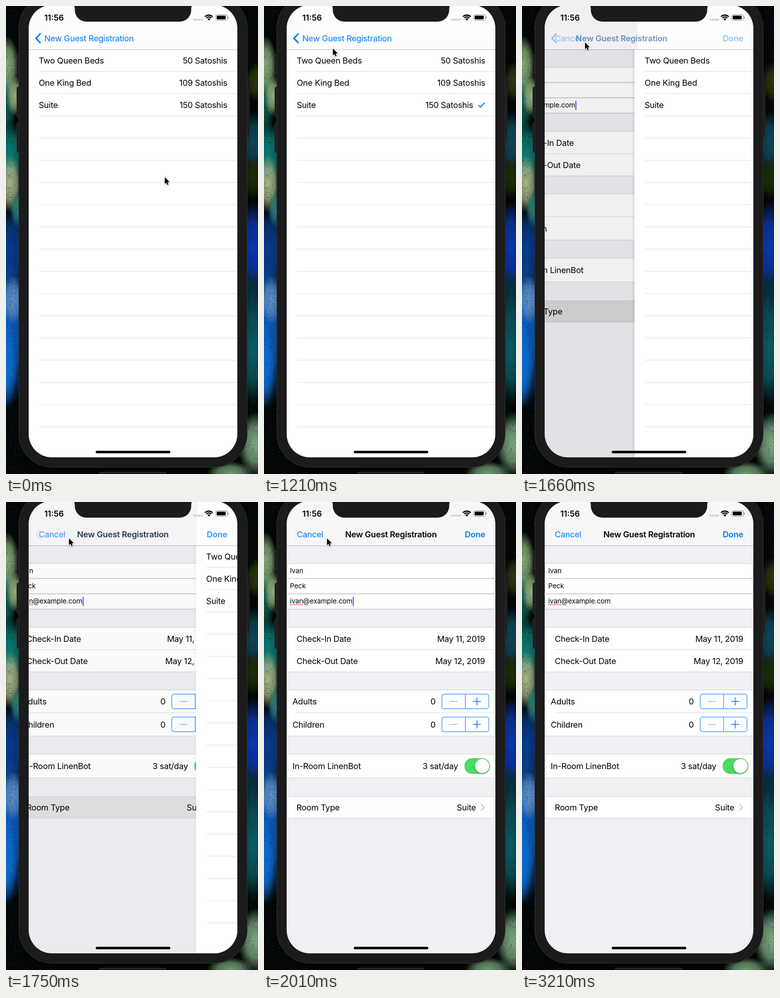
An HTML page with a canvas that plays this animation: 500 px wide and 927 px high, repeating every 3310 ms.

```html
<!DOCTYPE html>
<html lang="en">
<head>
<meta charset="utf-8">
<title>Guest registration</title>
<style>
  html, body { margin: 0; width: 100%; height: 100%; overflow: hidden; background: #000; }
  canvas { display: block; }
</style>
</head>
<body>
<canvas id="stage" width="500" height="927"></canvas>
<script>
const LOOP = 3310, BLUE = '#007aff', LEFT = 45, WIDTH = 414;
const stage = document.getElementById('stage');
let c = stage.getContext('2d');

// ---------- helpers ----------
function rect(x, y, w, h, fill) {
  c.fillStyle = fill;
  c.fillRect(x, y, w, h);
}

function box(x, y, w, h, r, fill, stroke) {
  c.beginPath();
  c.roundRect(x, y, w, h, r);
  if (fill) { c.fillStyle = fill; c.fill(); }
  if (stroke) { c.strokeStyle = stroke; c.lineWidth = 1; c.stroke(); }
}

function line(points, color, width) {
  c.beginPath();
  points.forEach(([x, y]) => c.lineTo(x, y));
  c.strokeStyle = color;
  c.lineWidth = width;
  c.stroke();
}

function text(s, x, y, { color = '#000', align = 'left', weight = 400, size = 16.5 } = {}) {
  c.font = `${weight} ${size}px Inter, "Open Sans", sans-serif`;
  c.letterSpacing = size < 15 ? '-0.1px' : size < 16.5 ? '0px' : '-0.25px';
  c.textAlign = align;
  c.fillStyle = color;
  c.fillText(s, x, y);
}

function faded(alpha, draw) {
  c.save();
  c.globalAlpha *= Math.max(0, Math.min(1, alpha));
  draw();
  c.restore();
}

const right = { align: 'right' };

// ---------- desktop and phone body, drawn once ----------
function blob(x, y, rx, ry, color) {
  const g = c.createRadialGradient(0, 0, 0, 0, 0, 1);
  g.addColorStop(0, color);
  g.addColorStop(0.55, color + 'c0');
  g.addColorStop(1, color + '00');
  c.save();
  c.translate(x, y);
  c.scale(rx, ry);
  rect(-1, -1, 2, 2, g);
  c.restore();
}

function drawDesktop() {
  rect(0, 0, 500, 927, '#030606');
  [
    [0, 190, 22, 70, '#0d5a4c'], [2, 118, 24, 60, '#86a877'], [18, 178, 18, 40, '#93aa7a'],
    [8, 290, 32, 60, '#0a7a74'], [8, 352, 24, 58, '#a3b588'], [22, 405, 14, 38, '#2a8274'],
    [8, 485, 36, 85, '#083c92'], [4, 650, 40, 150, '#0a60c6'], [14, 582, 24, 48, '#5d8bc4'],
    [0, 715, 22, 80, '#0b6cd0'], [498, 150, 24, 40, '#2a360c'], [492, 270, 26, 62, '#0f465c'],
    [490, 340, 22, 42, '#1b2e05'], [490, 480, 32, 95, '#0a38b0'], [490, 580, 26, 60, '#06323e'],
    [490, 680, 30, 110, '#0b5c64'], [496, 868, 36, 64, '#7aa880'], [445, 926, 46, 24, '#6b966c']
  ].forEach(b => blob(...b));

  let seed = 7;
  const rnd = () => (seed = seed * 16807 % 2147483647) / 2147483647;
  const specks = ['#000', '#031416', '#0b4a4c', '#2c4a1c'];
  for (let i = 0; i < 1500; i++) {
    const x = rnd() < 0.5 ? rnd() * 34 : 500 - rnd() * 34;
    rect(x | 0, rnd() * 927 | 0, 1, 1, specks[rnd() * 4 | 0]);
  }

  box(184.5, 923.5, 134, 12, 4, '#1c1c1c', '#3a3a3a');
  [[21.5, 97.5, 34], [21.5, 160.5, 60], [21.5, 230.5, 60], [475.5, 161.5, 99]]
    .forEach(([x, y, h]) => box(x, y, 7, h, 2, '#191919', '#303030'));
  box(25.5, -22, 453, 935.5, 66, '#1b1b1b', '#343434');
}

// ---------- room list ----------
function drawList(checked) {
  rect(LEFT, 86, WIDTH, 810, '#fff');
  for (let y = 129; y < 840; y += 44) rect(65, y, 394, 1, '#e1e1e3');
  [['Two Queen Beds', 50], ['One King Bed', 109], ['Suite', 150]].forEach(([name, price], i) => {
    const y = 114 + i * 44, on = checked && i === 2;
    text(name, 65, y);
    text(price + ' Satoshis', on ? 415 : 439, y, right);
    if (on) line([[425.5, 196.5], [429.5, 200.5], [437.5, 191.5]], BLUE, 2);
  });
}

// ---------- registration form ----------
function group(top, bottom, fill = '#fff') {
  rect(LEFT, top, WIDTH, bottom - top, fill);
  rect(LEFT, top, WIDTH, 1, '#d6d6d9');
  rect(LEFT, bottom - 1, WIDTH, 1, '#d6d6d9');
}

function stepper(label, y) {
  text(label, 57, y + 6);
  text('0', 341, y + 6, right);
  box(353.5, y - 14.5, 93, 29, 4, null, BLUE);
  line([[400, y - 14.5], [400, y + 14.5]], BLUE, 1);
  line([[369, y], [384.5, y]], '#80bcff', 1.4);
  line([[415, y], [431, y]], BLUE, 1.5);
  line([[423, y - 8], [423, y + 8]], BLUE, 1.5);
}

function drawForm(selected, caret) {
  rect(LEFT, 86, WIDTH + 130, 810, '#efeff4');

  group(121, 213);
  ['Ivan', 'Peck', 'ivan@example.com'].forEach((s, i) => {
    const y = 121.5 + i * 30.3;
    box(45.5, y, 413, 29.8, 5, '#fff', '#cbcbcd');
    if (i) rect(65, Math.round(y - 1), 394, 1, '#c0c0c2');
    text(s, 52, y + 19, { size: 13.6 });
  });
  c.fillStyle = '#f33';
  for (let x = 53; x < 79; x += 3) {
    c.beginPath();
    c.arc(x, 203.5, 1.1, 0, 7);
    c.fill();
  }
  faded(caret, () => rect(176.5, 188, 2, 18, '#3f6be0'));

  group(248, 337);
  rect(65, 292, 394, 1, '#dcdcdf');
  text('Check-In Date', 65, 277);
  text('May 11, 2019', 439, 277, right);
  text('Check-Out Date', 65, 321);
  text('May 12, 2019', 439, 321, right);

  group(372, 464);
  rect(65, 417, 394, 1, '#dcdcdf');
  stepper('Adults', 395);
  stepper('Children', 440.5);

  group(499, 547);
  text('In-Room LinenBot', 57, 529);
  text('3 sat/day', 385.5, 529, right);
  box(398, 507.5, 51, 31, 15.5, '#4cd964');
  c.save();
  c.shadowColor = 'rgba(0,0,0,.28)';
  c.shadowBlur = 4;
  c.shadowOffsetY = 2;
  box(419.5, 509, 28, 28, 14, '#fff');
  c.restore();

  const shade = 255 - 38 * selected;
  group(583, 627, `rgb(${shade},${shade},${shade})`);
  text('Room Type', 65, 611);
  text('Suite', 421, 611, right);
  line([[431.5, 599], [437.5, 605], [431.5, 611]], '#c7c7cc', 2);
}

// ---------- bars ----------
function drawNav(p, pressed, edge) {
  rect(LEFT, -2, WIDTH, 88, '#fdfdfd');
  if (p) {
    rect(LEFT, -2, Math.min(WIDTH, edge - LEFT + 10 * (1 - p)), 88, '#f7f7f9');
    rect(LEFT, -2, Math.min(WIDTH, edge - LEFT + 10 * (1 - p)), 88, `rgba(0,0,0,${0.05 * (1 - p)})`);
  }
  rect(LEFT, 86, WIDTH, 1, 'rgba(0,0,0,.24)');

  faded(pressed ? 0.7 * (1 - p) : 1, () =>
    line([[68.5, 54.5], [59.5, 64], [68.5, 73.5]], BLUE, 3));
  faded(pressed ? 0.2 + 0.8 * p : 1, () => {
    const color = `rgb(0,${122 * (1 - p)},${255 * (1 - p)})`;
    const mid = 164.7 + 87.6 * p - 20 * p * (1 - p);
    text('New Guest Registration', mid, 70, { color, align: 'center', weight: p > 0.2 ? 600 : 400 });
  });
  faded(p, () => {
    text('Cancel', 65, 70, { color: BLUE });
    text('Done', 439, 70, { color: BLUE, align: 'right', weight: 600 });
  });
}

function drawStatus() {
  text('11:56', 76, 28.5, { weight: 600, size: 16 });
  for (let i = 0; i < 4; i++) box(371.5 + i * 5, 25, 4, 4, 1, '#cfcfd1');

  c.strokeStyle = '#000';
  c.lineWidth = 2.3;
  [10.5, 6.8].forEach(r => {
    c.beginPath();
    c.arc(402.5, 28.5, r, -Math.PI * 0.76, -Math.PI * 0.24);
    c.stroke();
  });
  c.fillStyle = '#000';
  c.beginPath();
  c.moveTo(402.5, 29);
  c.arc(402.5, 28.5, 4, -Math.PI * 0.76, -Math.PI * 0.24);
  c.fill();

  box(416, 17, 23.5, 11.5, 3.5, null, '#8a8a8a');
  box(418, 19, 18, 7.5, 1.8, '#000');
  box(440.5, 21, 1.5, 4, 1, '#8a8a8a');

  // notch with its two outer fillets
  c.fillStyle = '#1b1b1b';
  c.beginPath();
  c.moveTo(130, -2);
  c.quadraticCurveTo(136.5, -2, 136.5, 5);
  c.arcTo(136.5, 31, 160, 31, 23);
  c.arcTo(367.5, 31, 367.5, 5, 23);
  c.lineTo(367.5, 5);
  c.quadraticCurveTo(367.5, -2, 374, -2);
  c.fill();

  box(178, 881, 148, 5, 2.5, '#000');
}

// ---------- pointer ----------
const path = [
  [20, 314, 338], [300, 21, 134], [570, 247, 199], [830, 247, 199], [1380, 124, 71],
  [2040, 124, 71], [2560, 330, 829], [2610, 330, 829], [3150, 428, 932]
];

function pointerAt(t) {
  const i = path.findIndex(k => k[0] > t);
  if (i < 1) return path[i ? path.length - 1 : 0].slice(1);
  const [t0, x0, y0] = path[i - 1], [t1, x1, y1] = path[i];
  const u = (t - t0) / (t1 - t0), e = u * (2 - u);
  return [x0 + (x1 - x0) * e, y0 + (y1 - y0) * e];
}

function drawPointer(x, y) {
  c.save();
  c.translate(x, y);
  c.beginPath();
  [[1, 1], [1, 14.5], [4, 11.8], [6, 16.5], [8.3, 15.5], [6.3, 11], [10.4, 10.6]]
    .forEach(([px, py]) => c.lineTo(px, py));
  c.closePath();
  c.shadowColor = 'rgba(0,0,0,.35)';
  c.shadowBlur = 2;
  c.shadowOffsetY = 1;
  c.strokeStyle = '#fff';
  c.lineWidth = 2;
  c.stroke();
  c.shadowColor = 'transparent';
  c.fillStyle = '#000';
  c.fill();
  c.restore();
}

// ---------- timing ----------
// The screen refreshes in coarse steps, slower once the views slide.
function stepped(t) {
  const [start, d] = t < 1487 ? [60, 57.5] : [1490, 86.67];
  return Math.max(0, start + Math.floor((t - start + 5) / d) * d);
}

// Critically damped spring
function slide(t) {
  if (t < 1581) return 0;
  if (t > 2110) return 1;
  const w = (t - 1581) * 0.0178;
  return 1 - (1 + w) * Math.exp(-w);
}

function caretAlpha(t) {
  const phase = (t + 790) % 1000 / 1000;
  if (phase < 0.02) return 0.12;
  return Math.min((phase - 0.33) / 0.1, (1.02 - phase) / 0.16);
}

const desktop = document.createElement('canvas');
desktop.width = 500;
desktop.height = 927;
const main = c;
c = desktop.getContext('2d');
drawDesktop();
c = main;

function draw(time) {
  const t = time % LOOP, s = stepped(t), p = slide(s);
  const shift = WIDTH * p, edge = LEFT + shift;
  c.drawImage(desktop, 0, 0);

  c.save();
  c.beginPath();
  c.roundRect(LEFT, -2, WIDTH, 896, 46);
  c.clip();
  if (p > 0) {
    c.save();
    c.translate(-124 * (1 - p), 0);
    drawForm(1 - p ** 7, caretAlpha(t));
    c.restore();
    rect(LEFT, 86, WIDTH, 810, `rgba(0,0,0,${0.1 * (1 - p)})`);
  }
  if (p < 1) {
    const g = c.createLinearGradient(edge - 7, 0, edge, 0);
    g.addColorStop(0, 'rgba(0,0,0,0)');
    g.addColorStop(1, `rgba(0,0,0,${0.14 * (1 - p)})`);
    rect(edge - 7, 86, 7, 810, g);
    c.save();
    c.translate(shift, 0);
    drawList(t >= 630);
    c.restore();
  }
  drawNav(p, t >= 1487, edge);
  drawStatus();
  c.restore();

  drawPointer(...pointerAt(s));
}

const begin = performance.now();
function tick() {
  draw(performance.now() - begin);
  requestAnimationFrame(tick);
}
tick();
</script>
</body>
</html>
```
